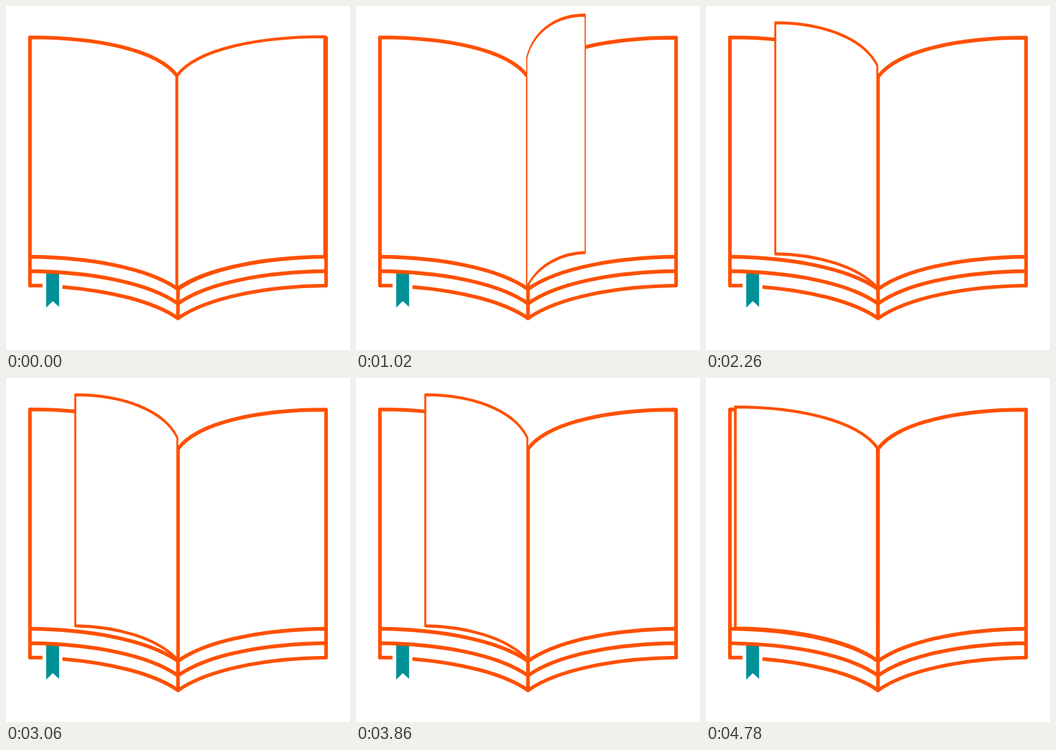
These frames come from a looping animation (500 px wide and 500 px high, 4800 ms). An HTML page:

```html
<!DOCTYPE html>
<html lang="en">
<head>
<meta charset="utf-8">
<title>Book with turning pages</title>
<style>
  html, body { margin: 0; width: 100%; height: 100%; overflow: hidden; background: #fff; }
  svg { display: block; width: 100vw; height: 100vh; }
  path { stroke: #ff5000; stroke-linejoin: round; fill: none; }
</style>
</head>
<body>
<svg viewBox="0 0 500 500">
  <polygon points="58.4,387 77.2,387 77.2,437.3 68,429 58.4,438.5" fill="#009097"/>
  <g stroke-width="5.3">
    <!-- covers and spine -->
    <path d="M53 406.4H34.8V45.6C130 45.6 220 63 249 102"/>
    <path d="M82 408.3C150 414 214 429 250 454C294 423 380 407.5 465.2 406.4V46C369 46 279 64 250 103V454"/>
    <!-- page block -->
    <path d="M35 364.5C120 365.5 205 380 250 411.5C294 380 380 365.5 465 364.5"/>
    <path d="M35 385.5C120 386.5 205 401 250 432.5C294 401 380 386.5 465 385.5"/>
  </g>
  <path id="page" stroke-width="4.2" style="fill:#fff"/>
</svg>
<script>
  const TURN = 800, UPRIGHT = 360;
  const PIVOT_Y = 436, EDGE_ON = 0.012;
  const page = document.getElementById('page');

  // Page outline, x measured from the spine and y from the pivot
  const outline = top => {
    const y = v => v - PIVOT_Y;
    return `M0 ${y(top)}C29 ${y(top - 39)} 119 ${y(44.8)} 215.6 ${y(44.8)}` +
      `V${y(364)}C131 ${y(365)} 44 ${y(379.5)} 0 ${y(410.5)}Z`;
  };
  const right = { spine: 248.3, lift: 0.131, side: 1, d: outline(101.5) };
  const left = { spine: 249, lift: 0.165, side: -1, d: outline(104) };

  function draw(now) {
    const t = now % TURN;
    const { spine, lift, side, d } = t < UPRIGHT ? right : left;
    const open = side > 0 ? 1 - t / UPRIGHT : (t - UPRIGHT) / (TURN - UPRIGHT);
    const width = side * (EDGE_ON + (1 - EDGE_ON) * open);
    const height = 1 + lift * (1 - open);
    page.setAttribute('d', d);
    page.setAttribute('transform',
      `translate(${spine} ${PIVOT_Y}) scale(${width} ${height})`);
  }

  const start = performance.now();
  function tick() {
    draw(performance.now() - start);
    requestAnimationFrame(tick);
  }
  tick();
</script>
</body>
</html>
```
